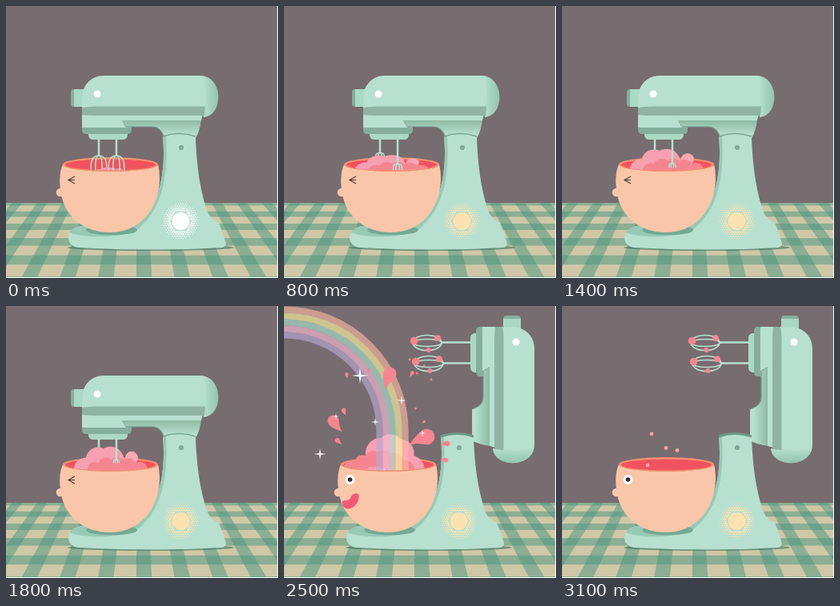
Animation, 340 px wide and 340 px high, one loop 3400 ms. Source, as an HTML page with a canvas:

```html
<!DOCTYPE html>
<html lang="en">
<head>
<meta charset="utf-8">
<title>Mixer</title>
<style>
  html, body { margin: 0; width: 100%; height: 100%; overflow: hidden; background: #fff; }
  canvas { display: block; }
</style>
</head>
<body>
<canvas id="stage" width="340" height="340"></canvas>
<script>
const ctx = document.getElementById('stage').getContext('2d');
const MINT = '#b7e0d0', PALE = '#aad9c6', SAGE = '#8fb3a5', MOSS = '#86ae9e', LEAF = '#6d9b89',
      SKIN = '#fac6a9', RIM = '#f4916f', RED = '#f1525f', CORAL = '#f58691', PINK = '#f7a0b2';
const TAU = Math.PI * 2;

const lerp = (a, b, k) => a + (b - a) * k;

function noise(seed) {
  const n = Math.sin(seed * 12.9898) * 43758.5453;
  return n - Math.floor(n);
}

function shape(path, color) {
  ctx.fillStyle = color;
  ctx.fill(new Path2D(path));
}

function line(path, color, width) {
  ctx.strokeStyle = color;
  ctx.lineWidth = width;
  ctx.stroke(new Path2D(path));
}

function oval(x, y, rx, ry, color) {
  ctx.beginPath();
  ctx.ellipse(x, y, rx, ry, 0, 0, TAU);
  ctx.fillStyle = color;
  ctx.fill();
}

const dot = (x, y, r, color) => oval(x, y, r, r, color);

function gradient(x0, y0, x1, y1, from, to) {
  const g = ctx.createLinearGradient(x0, y0, x1, y1);
  g.addColorStop(0, from);
  g.addColorStop(1, to);
  return g;
}

function layer(draw) {
  ctx.save();
  draw();
  ctx.restore();
}

function drawRoom() {
  ctx.fillStyle = '#fff';
  ctx.fillRect(0, 0, 340, 340);
  ctx.beginPath();
  ctx.rect(0, 0, 339, 339);
  ctx.clip();
  ctx.fillStyle = '#776c70';
  ctx.fillRect(0, 0, 340, 246);
  layer(drawTablecloth);
}

// A gingham cloth in perspective, vanishing at (165, 71).
function drawTablecloth() {
  const check = 'rgba(75,150,128,.5)';
  const rowY = v => 71 + 1 / (.00406 + .00041 * v);
  const columnX = (u, y) => 165 + u * (y - 71) / 247;
  ctx.beginPath();
  ctx.rect(0, 246, 340, 94);
  ctx.clip();
  ctx.fillStyle = '#cfc8a8';
  ctx.fillRect(0, 246, 340, 94);
  for (let k = -1; k < 5; k++) {
    ctx.fillStyle = check;
    ctx.fillRect(0, rowY(k + .23), 340, rowY(k - .23) - rowY(k + .23));
  }
  for (let k = -6; k <= 6; k++) {
    const left = 44 * k - 2, right = left + 18;
    shape(`M${columnX(left, 246)} 246H${columnX(right, 246)}L${columnX(right, 340)} 340H${columnX(left, 340)}Z`, check);
  }
}

function drawHead() {
  shape('M145 143L150 151H183C191 151 195 156 198 165H237Q242 157 244 143Z',
    gradient(0, 143, 0, 161, '#8fbaa4', MINT));
  line('M150 151H183C191 151 195 156 198 165', LEAF, 1.2);
  shape('M244 87C272 89 272 137 247 139Z', gradient(246, 0, 266, 0, MINT, '#92c3af'));
  shape('M85 104H99V126H85Z', PALE);
  shape('M85 104V126Q81 126 81 122V108Q81 104 85 104Z', MOSS);
  shape('M103 159H152V162Q151 167 146 167H109Q104 167 103 162Z', PALE);
  shape('M95 150H157V155Q157 160 152 160H100Q95 160 95 155Z', MOSS);
  shape('M97 104C102 93 110 87 123 87H243Q247 87 248 94Q252 118 244 143H145L150 152H95V126Q95 110 97 104Z', MINT);
  shape('M95 127Q104 125 119 125.500H249L248 137H116Q103 137 95 136Z', SAGE);
  dot(114, 110, 4.5, '#fff');
}

function drawBadge(color) {
  const x = 218.5, y = 269;
  for (let row = -8; row <= 8; row++) {
    for (let col = -8; col <= 8; col++) {
      const dx = (col + (row & 1) / 2) * 3, dy = row * 2.7, d = Math.hypot(dx, dy);
      if (d > 13 && d < 22.5) dot(x + dx, y + dy, 1.4 - (d - 13) * .09, color);
    }
  }
  dot(x, y, 11, color);
}

const STAND = 'M196 163Q216 156 237 163C238 198 243 235 253 260Q257 267 266 271'
  + 'Q272 284 275 297Q275 301 270 302Q185 307 90 302Q79 300 78 291Q77 276 101 274'
  + 'H160C188 258 201 215 196 163Z';

function drawStand(lifted, badge) {
  oval(181, 302, 104, 4, 'rgba(55,115,92,.6)');
  layer(() => {
    if (lifted) ctx.transform(0, 1, -1, 0, 400, -69);
    drawHead();
  });
  shape(STAND, MINT);
  layer(() => {
    ctx.clip(new Path2D(STAND));
    shape('M190 160L200 163C203 215 195 252 167 277C150 290 100 292 76 282V262H170Z', '#98cab6');
    oval(132, 280, 32, 6.5, '#74a994');
  });
  line('M196 163Q216 156 237 163', lifted ? LEAF : '#78a594', lifted ? 3 : 1.5);
  dot(219, 177, 3.1, '#82aa9a');
  drawBadge(badge);
}

function drawBowlBack() {
  oval(130.5, 198, 59.5, 9, RIM);
  oval(130.5, 198.5, 56.5, 7, RED);
}

function drawBowlFront(mood) {
  dot(68, 233, 5.3, SKIN);
  shape('M71 198A59.500 9 0 0 0 190 198Q192 206 192 217C191 256 165 283 130 283'
    + 'C98 283 76 264 70 240Q64 214 71 198Z', SKIN);
  shape('M71 198A59.500 9 0 0 0 190 198L187 198.500A56.500 7 0 0 1 74 198.500Z', RIM);
  if (mood === 'mixing') {
    line('M86 213L78 217.500L86 222M79 217.500H86', '#4b3b3d', 1.2);
    return;
  }
  dot(82.5, 217, 6, '#fff');
  dot(82.5, 217, 2.8, '#33292c');
  if (mood === 'happy') {
    shape('M93 235C88 233 85 235 83 240C81 244 76 242 73 244C72 251 77 255 83 253C91 250 95 242 93 235Z', '#f25a72');
  }
}

// A row of lumps piled up into an arch.
function heap(color, count, { x, spread, height, r }) {
  for (let i = 0; i < count; i++) {
    const u = 2 * i / (count - 1) - 1;
    dot(x + u * spread, 205 - height * (1 - u * u), r * (.85 + .3 * noise(i + count)), color);
  }
}

function drawWhisk(x, top, step) {
  const width = 10 / (1 + .2 * step), bottom = top + 21 / (1 + .4 * step);
  line(`M${x} 167V${top + 1}`, MINT, 2.5);
  for (const w of [-width, -width * .42, width * .42, width]) {
    line(`M${x} ${top}C${x + w} ${top} ${x + w} ${lerp(top, bottom, .45)} ${x + w} ${bottom}`, MINT, 1.5);
  }
}

function drawMixing(step) {
  const width = Math.min(1, .4 + .2 * step);
  const height = (4 + 4.8 * step - .21 * step * step) / 30;
  const batter = draw => layer(() => {
    ctx.translate(131, 206);
    ctx.scale(width, height);
    ctx.translate(-131, -206);
    draw();
  });
  drawWhisk(116, 187 - step * .9, step);
  batter(() => {
    heap(PINK, 4, { x: 123, spread: 23, height: 14, r: 16 });
    dot(157, 190, 8, '#f9a8b4');
    heap(CORAL, 5, { x: 139, spread: 28, height: 7, r: 10 });
  });
  drawWhisk(138, 187 + 11 * Math.sin(step * .3), step);
}

function drawDrop(x, y, r, angle) {
  layer(() => {
    ctx.translate(x, y);
    ctx.rotate(angle);
    ctx.scale(r, r);
    shape('M0 -1C.8 -1 1 0 2.500 .250C1.500 .700 .800 1 0 1A1 1 0 0 1 0 -1Z', CORAL);
  });
}

// Drops fan out from the bowl, tails pointing back; every fourth one is big.
function drawDrops(fall) {
  for (let i = 0; i < 12; i++) {
    const angle = (-148 + 13 * i) * Math.PI / 180, big = i % 4 === 1;
    const reach = 56 + 42 * Math.sin(angle) ** 4;
    const distance = reach * (big ? 1 : .85 + .5 * noise(i)) * lerp(1, 1.4, fall);
    const r = (big ? 10 + i * .5 : 1.5 + 3 * noise(i + 20)) * lerp(1, big ? .35 : .6, fall);
    drawDrop(118 + distance * Math.cos(angle), 200 + distance * Math.sin(angle), r, angle + Math.PI);
  }
}

function drawSparkles(fall) {
  [[95, 94], [45, 192], [147, 125], [114, 152], [173, 166], [65, 145]].forEach(([x, y0], i) => {
    const y = y0 - 14 * fall, r = lerp(16 / (1 + i * .6), 5, fall), q = r * .12;
    shape(`M${x} ${y - r}L${x + q} ${y - q}L${x + r} ${y}L${x + q} ${y + q}L${x} ${y + r}`
      + `L${x - q} ${y + q}L${x - r} ${y}L${x - q} ${y - q}Z`, '#fff');
  });
}

function drawRainbow(alpha) {
  layer(() => {
    ctx.globalAlpha = alpha;
    ['#fbb5a2', '#fdf3a0', '#abe0ce', '#f7bbd5', '#baa8d3'].forEach((color, i) => {
      const r = 151.5 - i * 8;
      line(`M0 ${156 - r}A${r} ${r} 0 0 1 ${r} 156V206`, color, 8.2);
    });
  });
}

function drawRaisedWhisks(fall) {
  for (const [x, y] of [[179, 46], [181, 72]]) {
    line(`M${x + 18} ${y - .5}H234`, MINT, 2.5);
    for (const ry of [9.5, 4.5]) line(`M${x - 18} ${y}a18 ${ry} 0 1 1 36 0a18 ${ry} 0 1 1 -36 0`, MINT, 1.6);
    for (let i = 0; i < 4; i++) {
      const angle = (-165 + 125 * i) * Math.PI / 180;
      dot(x + 17 * Math.cos(angle), y + 9 * Math.sin(angle), 4.8 - .9 * i, CORAL);
    }
  }
  for (let i = 0; i < 4; i++) dot(157 + i * 9, 67 + i * 17 % 26, 3 * (1 - fall), CORAL);
}

function drawSplash(fall) {
  const pile = (from, to) => Object.fromEntries(
    Object.keys(from).map(key => [key, lerp(from[key], to[key], fall)]));
  if (!fall) drawRainbow(1);
  heap(PINK, 5, pile({ x: 120, spread: 34, height: 30, r: 14 }, { x: 146, spread: 14, height: 26, r: 23 }));
  heap(CORAL, 6, pile({ x: 132, spread: 46, height: 16, r: 13 }, { x: 104, spread: 20, height: 12, r: 9 }));
  if (fall) drawRainbow(lerp(1, .3, fall));
  drawDrops(fall);
}

function drawLastDrops() {
  for (const [x, y] of [[112, 160], [130, 177.5], [144, 180.5], [107, 199]]) dot(x, y, 2.4, '#f7a3a8');
}

function drawScene(step) {
  const lifted = step > 10, splashing = lifted && step < 14;
  const fall = Math.min(1, (step - 11) / 2);
  const shaking = !lifted && step > 0 && step % 2 === 0;
  const badgeLit = step === 0 || lifted && step % 2 === 1;
  layer(() => {
    drawRoom();
    if (shaking) ctx.translate(4, 0);
    drawStand(lifted, badgeLit ? '#fff' : '#fbe2b0');
    if (lifted) drawRaisedWhisks(fall);
    drawBowlBack();
    if (!lifted) drawMixing(step);
    else if (splashing) drawSplash(fall);
    else drawLastDrops();
    drawBowlFront(!lifted ? 'mixing' : splashing ? 'happy' : 'empty');
    if (splashing) drawSparkles(fall);
  });
}

function play() {
  const t = performance.now() % 3400;
  drawScene(t < 2200 ? Math.floor(t / 200) : 11 + Math.floor((t - 2200) / 300));
  requestAnimationFrame(play);
}
play();
</script>
</body>
</html>
```
